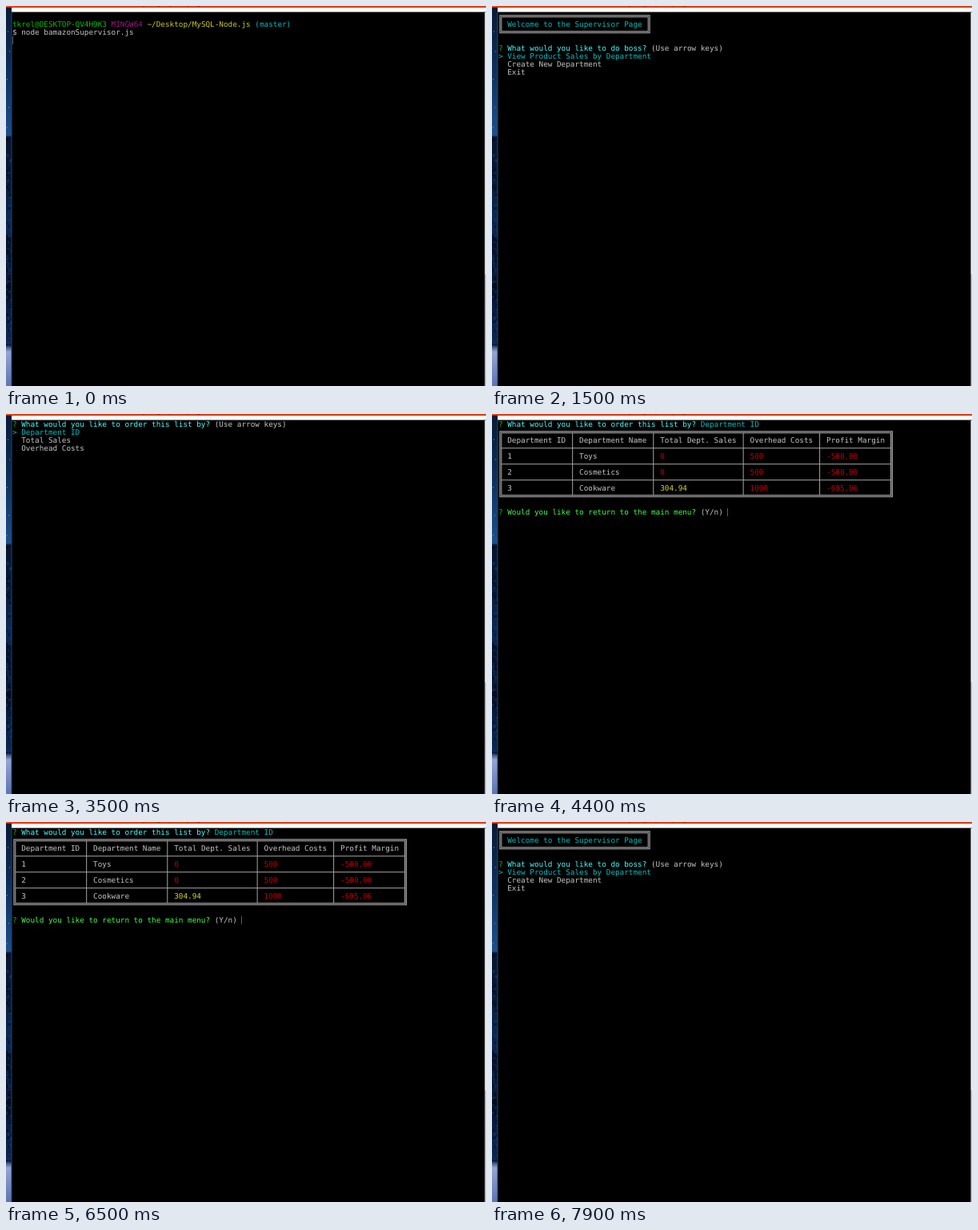
An HTML page for the animation above (8000 ms loop, 600 by 476 pixels).

```html
<!DOCTYPE html>
<html lang="en">
<head>
<meta charset="utf-8">
<title>Supervisor terminal</title>
<style>
html, body { margin: 0; width: 100%; height: 100%; overflow: hidden; background: #000; }
svg { display: block; width: 600px; height: 476px; }
text {
  font: 9.33px "DejaVu Sans Mono", "Liberation Mono", monospace;
  text-rendering: geometricPrecision;
  white-space: pre;
  fill: #c4c4c4;
}
.green { fill: #00bf00; }
.lime { fill: #40ff40; }
.cyan { fill: #00bfbf; }
.aqua { fill: #40ffff; }
.yellow { fill: #c8c81e; }
.gold { fill: #d8d830; }
.magenta { fill: #a8128c; }
.red { fill: #c40000; }
.rule { fill: none; stroke: #a6a6a6; }
.gap { fill: none; stroke: #484848; }
.cursor { fill: #5c5c5c; }

#prompt, #menu, #order, #report, #blink, #typed {
  visibility: hidden;
  animation: 8s step-end infinite;
}
#prompt { animation-name: prompt; }
#menu { animation-name: menu; }
#order { animation-name: order; }
#report { animation-name: report; }
#blink { animation-name: blink; }
#typed { animation-name: typed; }
@keyframes prompt { 0% { visibility: visible } 6.25%, 100% { visibility: hidden } }
@keyframes menu {
  0%, 26.25% { visibility: hidden }
  6.25%, 92.5%, 100% { visibility: visible }
}
@keyframes order { 0%, 55%, 100% { visibility: hidden } 26.25% { visibility: visible } }
@keyframes report { 0%, 92.5%, 100% { visibility: hidden } 55% { visibility: visible } }
@keyframes blink {
  0%, 61.25%, 75%, 86.25%, 100% { visibility: hidden }
  55%, 68.75%, 81.25% { visibility: visible }
}
@keyframes typed { 0%, 92.5%, 100% { visibility: hidden } 86.25% { visibility: visible } }
</style>
</head>
<body>
<svg viewBox="0 0 600 476">
  <defs>
    <linearGradient id="sky" x1="0" y1="0" x2="0" y2="1">
      <stop offset="0" stop-color="#081a36"/>
      <stop offset=".15" stop-color="#0c2c56"/>
      <stop offset=".34" stop-color="#1c4f8a"/>
      <stop offset=".345" stop-color="#06152e"/>
      <stop offset=".46" stop-color="#071a38"/>
      <stop offset=".55" stop-color="#0a2852"/>
      <stop offset=".6" stop-color="#0a2650"/>
      <stop offset=".61" stop-color="#04102a"/>
      <stop offset=".7" stop-color="#061838"/>
      <stop offset=".74" stop-color="#030c1e"/>
      <stop offset=".8" stop-color="#081f46"/>
      <stop offset=".89" stop-color="#0a2650"/>
      <stop offset=".91" stop-color="#94a4d4"/>
      <stop offset="1" stop-color="#5c74b4"/>
    </linearGradient>
  </defs>
  <rect width="600" height="476"/>
  <rect width="7" height="476" fill="url(#sky)"/>
  <path d="M2 32h1M4 57h1M1 92h1M3 127h1M1 152h1" stroke="#7d9cc4"/>
  <g id="trees"></g>
  <rect x="6.5" y="8" width="1" height="468" fill="#1c4674"/>
  <rect x="7" y="2" width="593" height="5.5" fill="#fff"/>
  <rect x="598.5" y="8" width="1.5" height="328" fill="#f4f4f4"/>
  <rect x="598.5" y="336" width="1.5" height="140" fill="#c9c9c9"/>
  <rect width="600" height="1.7" fill="#f2481a"/>
  <path d="M171 .5h2M189 .5h3M204 .5h2M226 .5h2M239 .5h3" stroke="#a83418"/>
  <g id="prompt"></g>
  <g id="menu"></g>
  <g id="order"></g>
  <g id="report"></g>
  <g id="blink"></g>
  <g id="typed"></g>
</svg>
<script>
const COL = 5.617, ROW = 10;
const colX = c => 8 + c * COL;
const midX = c => colX(c + .5);
const midY = r => 12.75 + r * ROW;

function add(scene, tag, attrs, text = "") {
  const el = document.createElementNS("http://www.w3.org/2000/svg", tag);
  for (const key in attrs) el.setAttribute(key, attrs[key]);
  el.textContent = text;
  document.getElementById(scene).append(el);
}

function put(scene, row, col, text, color = "") {
  add(scene, "text", { x: colX(col), y: 16 + row * ROW, class: color }, text);
}

// Writes coloured pieces one after another on a row.
function line(scene, row, ...parts) {
  let col = 0;
  for (const [text, color] of parts) {
    put(scene, row, col, text, color);
    col += text.length + 1;
  }
}

function frame(scene, lastCol, firstRow, lastRow) {
  const left = midX(0), top = midY(firstRow);
  const box = (d, name) => add(scene, "rect", {
    x: left - d, y: top - d, class: name,
    width: midX(lastCol) - left + 2 * d, height: midY(lastRow) - top + 2 * d
  });
  box(0, "gap");
  box(1, "rule");
  box(-1, "rule");
}

function cursor(scene, row, col) {
  add(scene, "rect", { x: Math.floor(colX(col)), y: 8 + row * ROW, width: 1, height: 10, class: "cursor" });
}

function choices(scene, row, question, items) {
  line(scene, row, ["?", "green"], [question, "aqua"], ["(Use arrow keys)"]);
  line(scene, row + 1, [">", "cyan"], [items[0], "cyan"]);
  items.slice(1).forEach((item, i) => put(scene, row + 2 + i, 2, item));
}

// Speckled foliage in the strip of wallpaper.
let seed = 7;
const rand = () => (seed = seed * 16807 % 2147483647) / 2147483647;
for (let i = 0; i < 110; i++) {
  add("trees", "rect", {
    x: rand() * 5, y: 165 + rand() * 260, width: 1 + rand() * 2, height: 1 + rand() * 3,
    fill: rand() < .5 ? "#020814" : "#123a70", opacity: .6
  });
}

line("prompt", 1, ["tkrel@DESKTOP-QV4H9K3", "green"], ["MINGW64", "magenta"],
  ["~/Desktop/MySQL-Node.js", "yellow"], ["(master)", "cyan"]);
put("prompt", 2, 0, "$ node bamazonSupervisor.js");
cursor("prompt", 3, 0);

frame("menu", 33, 0, 2);
put("menu", 1, 2, "Welcome to the Supervisor Page", "cyan");
choices("menu", 4, "What would you like to do boss?",
  ["View Product Sales by Department", "Create New Department", "Exit"]);

const orderBy = "What would you like to order this list by?";
choices("order", 0, orderBy, ["Department ID", "Total Sales", "Overhead Costs"]);

line("report", 0, ["?", "green"], [orderBy, "aqua"], ["Department ID", "cyan"]);
frame("report", 87, 1, 9);
const seps = [16, 34, 54, 71];
const rules = seps.map(c => `M${midX(c)} ${midY(1) + 1}V${midY(9) - 1}`).join("") +
  [3, 5, 7].map(r => `M${midX(0) + 1} ${midY(r)}H${midX(87) - 1}`).join("");
add("report", "path", { d: rules, class: "rule" });

const table = [
  ["Department ID", "Department Name", "Total Dept. Sales", "Overhead Costs", "Profit Margin"],
  ["1", "Toys", "0", "500", "-500.00"],
  ["2", "Cosmetics", "0", "500", "-500.00"],
  ["3", "Cookware", "304.94", "1000", "-695.06"]
];
table.forEach((cells, r) => cells.forEach((cell, c) => {
  const color = !r || c < 2 ? "" : cell === "304.94" ? "gold" : "red";
  put("report", 2 + 2 * r, [0, ...seps][c] + 2, cell, color);
}));
line("report", 11, ["?", "green"], ["Would you like to return to the main menu?", "lime"], ["(Y/n)"]);

cursor("blink", 11, 51);
put("typed", 11, 51, "y");
cursor("typed", 11, 52);
</script>
</body>
</html>
```
